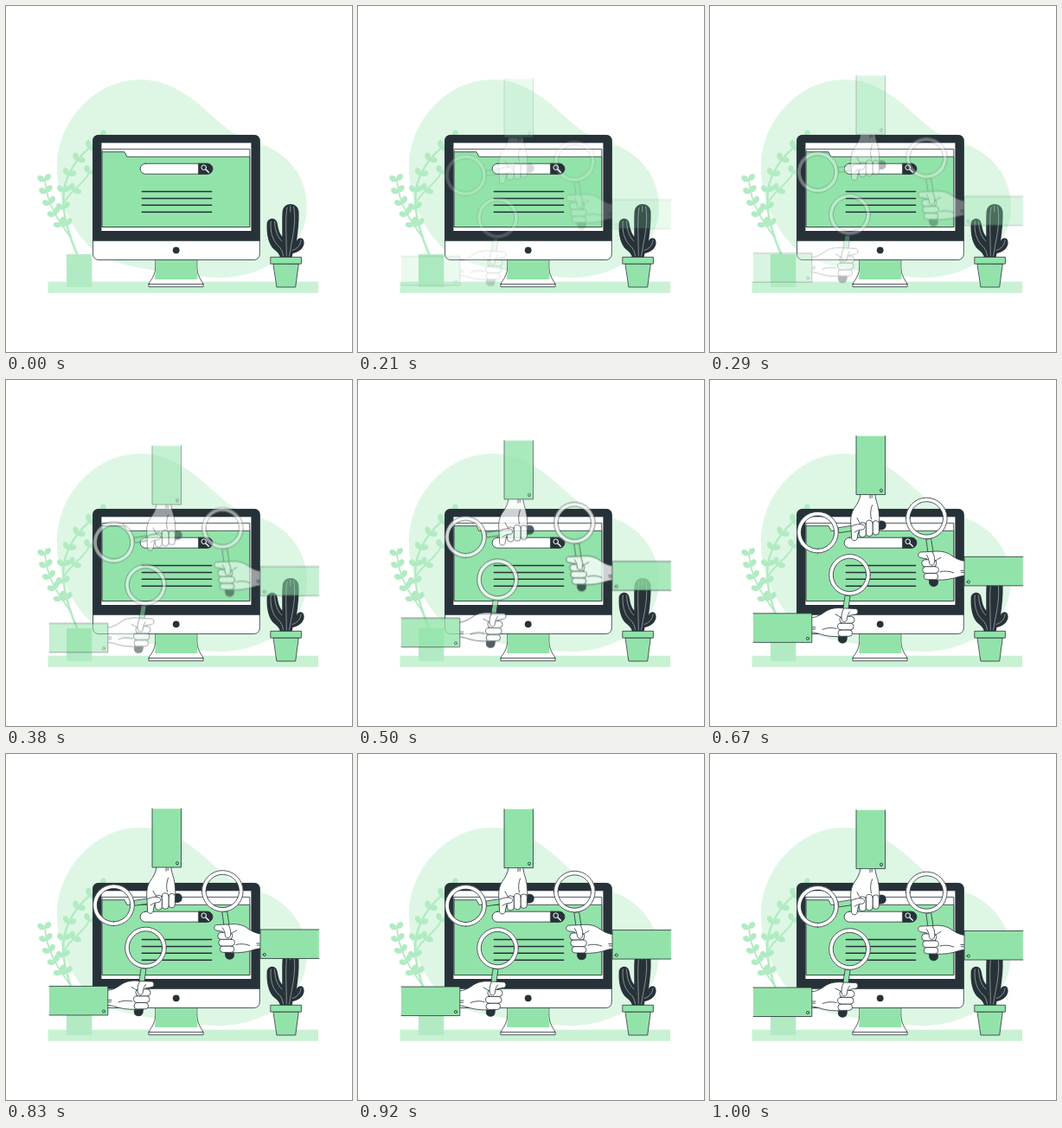
These frames come from a looping animation (400x400 px, 1040 ms). An HTML page:

```html
<!DOCTYPE html>
<html lang="en">
<head>
<meta charset="utf-8">
<title>Searching hands</title>
<style>
  html, body { margin: 0; width: 100%; height: 100%; overflow: hidden; background: #fff; }
  svg { display: block; width: 100vw; height: 100vh; }
  .line { fill: none; stroke: #263238; stroke-width: .8; stroke-linecap: round; stroke-linejoin: round; }
  .green { fill: #92e3a9; }
  .white { fill: #fff; }
  .dark { fill: #263238; }
  .pale { fill: #b2ebc3; }
  .twig { fill: none; stroke: #b2ebc3; stroke-linecap: round; }
  .vein { fill: none; stroke: #fff; stroke-width: .45; stroke-linecap: round; }
</style>
</head>
<body>
<svg viewBox="0 0 400 400">
  <defs>
    <g id="arm">
      <!-- magnifier -->
      <path class="line green" d="M156.6 249L162 249.8L157.5 282L151.5 281Z"/>
      <path class="line dark" d="M149.3 290L159 291L158 301Q157 304.5 153 304.3Q148 304 148.3 299Z"/>
      <circle cx="161.5" cy="225.5" r="21.6" fill="none" stroke="#fff" stroke-width="4.8"/>
      <circle class="line" cx="161.5" cy="225.5" r="23.8"/>
      <circle class="line" cx="161.5" cy="225.5" r="19.2"/>
      <!-- hand -->
      <path class="line white" d="M117 275C124 274.5 129 271 134 267.5C139 264.3 146 263 154 264L168.5 264.6C172 265.6 171.8 270.4 168.5 271.1L161 272.5L158 296C150 297.5 138 297 130 294.8C126 293.4 121 292 117 291.8Z"/>
      <rect class="line white" x="148" y="289" width="16.5" height="7.4" rx="3.6"/>
      <rect class="line white" x="147.5" y="281.3" width="18.5" height="7.7" rx="3.7"/>
      <rect class="line white" x="150" y="273.4" width="17" height="7.9" rx="3.8"/>
      <path class="line white" d="M154.5 264.5C152 269 151.5 274 152.5 277.5C153.5 280.8 158 280.5 158.3 277C158.6 273 160 270 161.5 268"/>
      <path class="line" d="M145 271C147.5 272 149.5 273.5 151.6 275M130 288.5C135 286.5 141 286 146 287.5M118.5 286H122M118.5 288.2H121.5"/>
      <!-- sleeve -->
      <path class="green" d="M50 270H117.8V303.5H50Z"/>
      <path class="line" d="M50 270H117.8V303.5H50"/>
      <circle class="line" cx="113" cy="299" r="1.6"/>
    </g>
  </defs>

  <path fill="#def7e5" d="M59 183C61 130 105 85 155 85C194 85 222 112 244 132C262 149 277 154 290 158C325 168 348 197 348 232C348 285 295 314 247 314C215 314 180 307 150 302C120 296 100 285 85 265C68 241 58 212 59 183Z"/>
  <rect fill="#c9f1d4" x="48.5" y="318.7" width="312.5" height="13.1"/>

  <!-- plant -->
  <g id="plant">
    <path class="twig" stroke-width="2.6" data-from=".24" data-pairs="7" d="M83 289C66 250 60 218 74 192C82 176 95 163 112 153"/>
    <path class="twig" stroke-width="1.8" data-from=".35" data-pairs="2" d="M68 226C74 214 88 208 96 193"/>
    <path class="twig" stroke-width="1.8" data-from=".25" data-pairs="5" d="M75 268C62 250 48 232 45 202"/>
  </g>
  <rect class="pale" x="70" y="287" width="29.3" height="38"/>

  <!-- stand -->
  <path class="line white" d="M172.8 290V302C172.3 310 169.5 314.5 166 319.5L165 321.5V324.7H228V321.5L227 319.5C223.5 314.5 221.3 310 220.8 302V290Z"/>
  <path class="green" d="M173.2 290V303L172 316H221.6L220.4 303V290Z"/>
  <path class="line" d="M165 321.5H228"/>

  <!-- monitor -->
  <rect class="line white" x="100.5" y="149.4" width="192.8" height="144.1" rx="6.5"/>
  <path class="dark" d="M100.2 271.7V156Q100.2 149 107.2 149H286.6Q293.6 149 293.6 156V271.7Z"/>
  <circle class="dark" cx="196.7" cy="282.3" r="3.9"/>
  <rect class="white" x="110.4" y="158.3" width="173" height="101.7"/>
  <rect class="line white" x="111.4" y="165.4" width="170.4" height="90"/>
  <path class="line green" d="M111.4 168.7H137L139.8 174.3H281.8V255.6H111.4Z"/>
  <path class="line" style="stroke-width:1.5" d="M157.3 214.6H237.6M157.3 222.4H237.6M157.3 230.3H237.6M157.3 238.2H237.6"/>
  <rect class="line white" x="155.2" y="182.2" width="83.6" height="12" rx="6"/>
  <path class="line dark" d="M222.8 182.2H232.8A6 6 0 0 1 232.8 194.2H222.8Z"/>
  <g fill="none" stroke="#fff" stroke-linecap="round">
    <circle cx="228.7" cy="186.7" r="2.8" stroke-width="1"/>
    <path stroke-width="1.4" d="M231 189L234.3 192.2"/>
  </g>

  <!-- cactus -->
  <path class="dark" d="M316.8 291C316.5 287 314 284.5 310 281.5C303.5 276 301 264 301.6 252C302 244.5 312 243.5 313.6 251C314.8 257 315.5 262 319.3 266.5C319.5 257 319 246 319.6 238C320.5 226 337.5 226 338.5 238C339 249 337.5 260 336 272C337.5 267.5 343 267 344.3 271.5C346 278 340 284.5 331.5 286L330.5 291Z"/>
  <path class="vein" d="M325 233C322.8 245 324 262 324.3 289M332.5 232C335 243 333.5 258 330 275L327.5 289M328.7 231V238M306.3 249C305 260 308 271 314.5 277C318 280 320 284 320.5 289M310.5 249C311 259 313.5 267 319 272M341 271C340.5 277 336 281 331 282.5"/>
  <path class="line green" d="M309.3 298H338.3L334.7 325H313.3Z"/>
  <rect class="line green" x="306.2" y="290.3" width="35.2" height="7.8"/>

  <g id="arms">
    <use href="#arm"/>
    <use href="#arm" transform="matrix(-1 0 0 1 411.8 -65.5)"/>
    <use href="#arm" transform="matrix(0 1 1 0 -101 14.8)"/>
  </g>
</svg>
<script>
const LOOP = 1040, FPS = 24, HOLD = 126, RISE = 24;
const arms = document.getElementById('arms');
const plant = document.getElementById('plant');

function addLeaf(x, y, angle) {
  const leaf = document.createElementNS('http://www.w3.org/2000/svg', 'path');
  leaf.setAttribute('class', 'pale');
  leaf.setAttribute('d', 'M0 0C1.5 -4.6 8 -5 9.6 -1.2C10.2 3 4 4.6 0 0Z');
  leaf.setAttribute('transform', `translate(${x} ${y}) rotate(${angle})`);
  plant.append(leaf);
}

// Leaf pairs spread evenly along each twig.
for (const twig of plant.querySelectorAll('.twig')) {
  const length = twig.getTotalLength();
  const from = +twig.dataset.from, pairs = +twig.dataset.pairs;
  for (let i = 0; i < pairs; i++) {
    const at = length * (from + (1 - from) * i / (pairs - 1));
    const p = twig.getPointAtLength(at), q = twig.getPointAtLength(at - 2);
    const heading = Math.atan2(p.y - q.y, p.x - q.x) * 180 / Math.PI;
    addLeaf(p.x, p.y, heading - 50);
    addLeaf(p.x, p.y, heading + 50);
  }
}

const bezier = (a, b, s) => 3 * a * s * (1 - s) ** 2 + 3 * b * s * s * (1 - s) + s ** 3;

// Slow start, then a slight overshoot before settling.
function ease(x) {
  let low = 0, high = 1;
  for (let i = 0; i < 30; i++) {
    const mid = (low + high) / 2;
    if (bezier(.36, .5, mid) < x) low = mid; else high = mid;
  }
  return bezier(-.01, 1.38, low);
}

function render(now) {
  const t = now % LOOP;
  const step = Math.floor((t + 4) * FPS / 1000);
  // Each step shows the pose at its middle.
  const progress = t < HOLD ? 0 : ease(Math.min(1, (step + .5) / FPS));
  arms.setAttribute('opacity', Math.max(0, Math.min(1, progress)));
  arms.setAttribute('transform', `translate(0 ${RISE * (1 - progress)})`);
}

function tick() {
  render(performance.now());
  requestAnimationFrame(tick);
}
tick();
</script>
</body>
</html>
```
